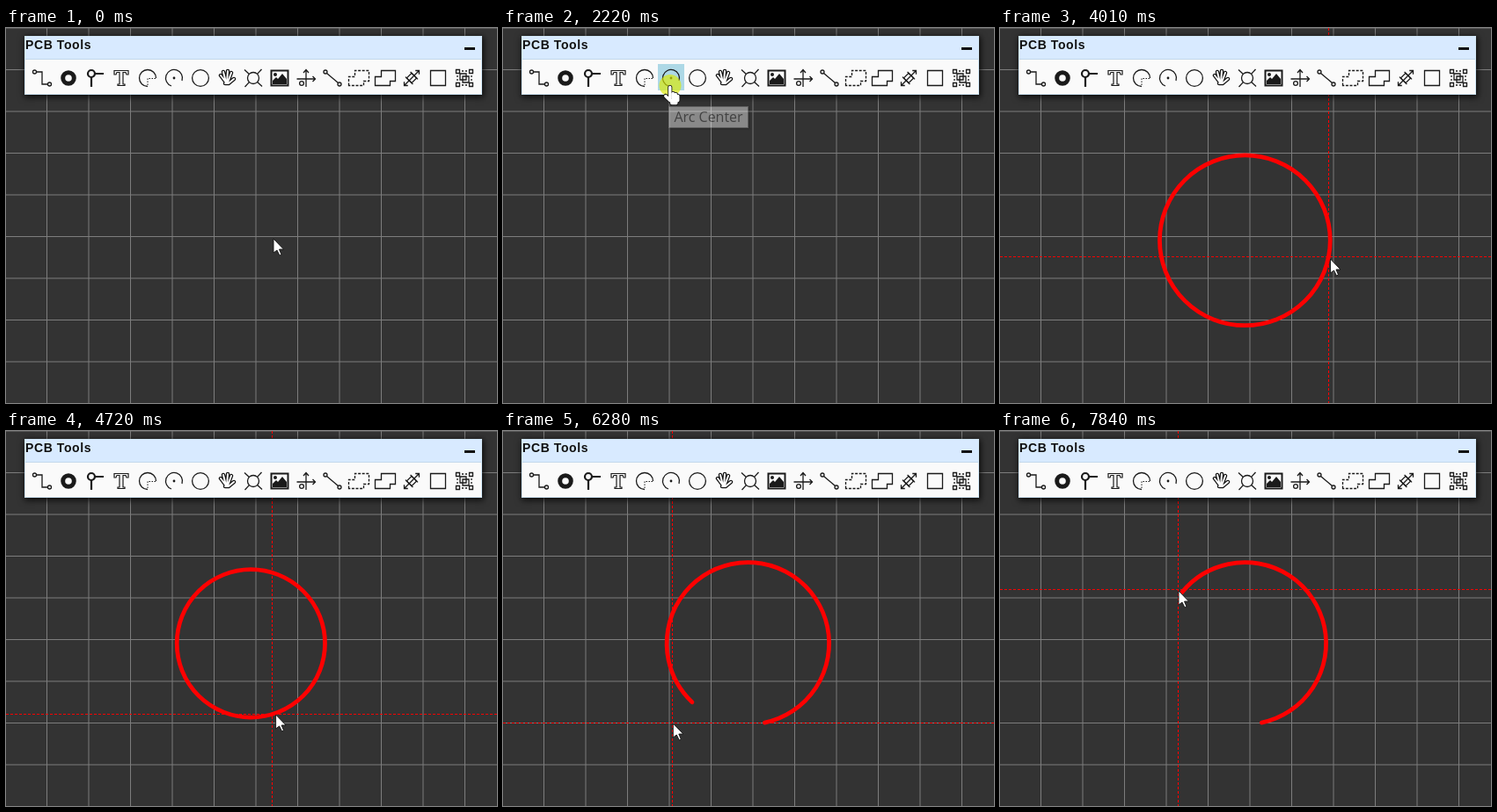
An HTML page with a canvas for the animation above (8000 ms loop, 558 by 427 pixels).

```html
<!DOCTYPE html>
<html lang="en">
<head>
<meta charset="utf-8">
<title>PCB Tools</title>
<style>
  html, body { margin: 0; width: 100%; height: 100%; overflow: hidden; background: #333; }
  #stage { position: absolute; left: 0; top: 0; width: 558px; height: 427px; overflow: hidden; }
  canvas, svg { position: absolute; left: 0; top: 0; display: block; }
  #bar {
    position: absolute; left: 21px; top: 9px; width: 520px; height: 67px; box-sizing: border-box;
    background: #fafafa; border: 1px solid #d0e6f5; box-shadow: 1px 2px 7px 1px rgba(0, 0, 0, .75);
  }
  #title {
    position: absolute; left: 0; top: 0; width: 518px; height: 26px; background: #d8eaff;
    border-bottom: 1px solid #c2d8ec; box-sizing: border-box; color: #111; letter-spacing: .6px;
    font: bold 14px/19px "Liberation Sans", Arial, sans-serif;
  }
  #title i { position: absolute; left: 499px; top: 12px; width: 12px; height: 3px; background: #111; }
  #hover { position: absolute; top: 41px; width: 30px; height: 30px; background: #add8e6; }
  #tip {
    position: absolute; left: 188px; top: 89px; width: 91px; height: 25px; box-sizing: border-box;
    border: 1px solid #999; background: #fff; color: #575757; text-align: center; white-space: nowrap;
    box-shadow: 1px 1px 2px rgba(0, 0, 0, .5); font: 16px/23px "Open Sans", "Noto Sans", sans-serif;
  }
  #icons { fill: none; stroke: #1a1a1a; stroke-width: 1.3; }
  .solid { fill: #1a1a1a; stroke: none; }
  .outline { fill: none; stroke: #111; stroke-linecap: round; stroke-linejoin: round; }
  .inside { fill: none; stroke: #fff; stroke-linecap: round; stroke-linejoin: round; }
</style>
</head>
<body>
<div id="stage">
  <canvas id="board" width="558" height="427"></canvas>
  <div id="bar"><div id="title">PCB Tools<i></i></div></div>
  <div id="hover"></div>
  <svg id="icons" width="558" height="427"></svg>
  <div id="tip">Arc Center</div>
  <svg width="558" height="427">
    <circle id="press" r="12.5" fill="rgb(218,234,0)" fill-opacity=".66"/>
    <path id="arrow" fill="#fff" stroke="#111" stroke-width=".9" d="M0 0V16L4 13 7 19 9 18 6.5 12H11.5Z"/>
    <g id="hand"></g>
  </svg>
</div>
<script>
const LOOP = 8000, TICK = 77.9, GRID = 47.5, STEP = GRID / 10;
const START = 37, FIX = 71, SWEEP = 77;   // ticks: centre set, radius set, sweep begins
const clicks = [2, 26, START, FIX];
const $ = id => document.getElementById(id);
const ctx = $('board').getContext('2d');

// pointer moves: first tick, last tick, destination
const home = [304, 240];
const moves = [
  [5, 13, 190.5, 65.5], [28, 35, 281, 243], [39, 45, 369, 263], [46, 52, 376, 263],
  [53, 60, 306.6, 323], [60, 67, 298, 333], [76, 80, 193.3, 333], [80, 87, 171, 303],
  [88, 93, 171, 148], [94, 100, 203, 182]
];

// icon helpers
const line = (d, attr = '') => `<path d="${d}" ${attr}/>`;
const ring = (x, y, r, attr = '') => `<circle cx="${x}" cy="${y}" r="${r}" ${attr}/>`;
const turn = (deg, s) => `<g transform="rotate(${deg})">${s}</g>`;
const spin = s => [0, 90, 180, 270].map(a => turn(a, s)).join('');
const ends = (x, y) => ring(-x, -y, 2) + ring(x, y, 2);
const box = r => line(`M${-r} ${-r}H${r}V${r}H${-r}Z`);
const glove = (d, w, rim) =>
  line(d, `class="outline" stroke-width="${w + rim}"`) + line(d, `class="inside" stroke-width="${w}"`);
const step = 'M-11.5 8.5V-1.5H-4.5V-8.5H11.5V3.5H5.5V8.5Z';
const fingers = 'M-1 5L-7-3M-1 5L-4-7M0 5L1-8M1 5L5-6M2 6L8 1M-2 6H2';
const finger = 'M0 2V15M3.5 9V17M6.5 10V17M9 12V17M-5 12L0 17M2 17V20H7V17Z';

const icons = [
  ends(8.5, 7) + line('M-6.5-7H0V7H6.5'),
  ring(0, 0, 6.3, 'stroke-width="5"'),
  `<g stroke-width="2.2">${ring(-4, -5, 4)}${line('M-4-1V10M0-5H10')}</g>`,
  line('M-8-8.5H8V-4H6L5-6.5H2V7H4V8.5H-4V7H-2V-6.5H-5L-6-4H-8Z', 'stroke-width="1.2"'),
  line('M0 9.5A9.5 9.5 0 1 1 9.5 0') + line('M9 .5H0V9', 'stroke-width="1" stroke-dasharray="1.5"'),
  line('M-3 9A9.5 9.5 0 1 1 9 3') + ring(0, 0, 1.4, 'class="solid"'),
  ring(0, 0, 9.4),
  glove(fingers, 2, 2.4),
  ring(0, 0, 6.5) + spin(line('M4.6 4.6L10 9.5')),
  line('M-9.5-8.5H9.5V8.5H-9.5Z', 'stroke-width="2"') + ring(-5, -4, 2, 'class="solid"') +
    line('M-8 7V3L-4-1-2 1 3-5 8 1V7Z', 'class="solid"'),
  line('M0 10V-9M-3-6L0-9.5 3-6M-10.5 1H10.5M7.5-2L10.5 1 7.5 4') + ring(-5, 6, 2.4),
  ends(8, 7) + line('M-6.5-5.5L6.5 5.5'),
  line(step, 'stroke-dasharray="3 1.6"'),
  line(step),
  turn(-45, box(4) + line('M-12 0H12M-9-3L-12 0-9 3M9-3L12 0 9 3M-4-6V6M4-6V6')),
  box(8.5),
  line('M-5-5H2V2H-5ZM-2-2H5V5H-2Z') + spin(line('M-9.5-9.5h4v4h-4z') + line('M-3-8H-1M1-8H3'))
];
$('icons').innerHTML = icons.map((s, i) => `<g transform="translate(${41 + 30 * i} 57)">${s}</g>`).join('');
$('hand').innerHTML = glove(finger, 3.4, 1.6);

const clamp = v => Math.min(1, Math.max(0, v));
const smooth = f => f * f * (3 - 2 * f);

function pointer(n) {
  let [x, y] = home;
  for (const [a, b, tx, ty] of moves) {
    const f = smooth(clamp((n - a) / (b - a)));
    x += (tx - x) * f;
    y += (ty - y) * f;
  }
  return [x, y];
}
const snap = (v, base) => base + Math.floor((v - base) / STEP) * STEP;
const cross = n => {
  const [x, y] = pointer(n);
  return [snap(x, 45.6), snap(y, 47.1)];
};
const centre = cross(START);
function polar(n) {
  const [x, y] = cross(n), dx = x - centre[0], dy = y - centre[1];
  return { r: Math.hypot(dx, dy), a: Math.atan2(dy, dx) };
}
const fixed = polar(FIX);

function lines(xs, ys) {
  ctx.beginPath();
  for (const x of xs) { ctx.moveTo(x, 0); ctx.lineTo(x, 427); }
  for (const y of ys) { ctx.moveTo(0, y); ctx.lineTo(558, y); }
  ctx.stroke();
}

function grid() {
  const steps = [...Array(12).keys()].map(i => i * GRID);
  ctx.fillStyle = '#333';
  ctx.fillRect(0, 0, 558, 427);
  ctx.strokeStyle = '#7d7d7d';
  ctx.lineWidth = 1;
  lines(steps.map(v => v - 1), steps);
}

function crosshair(n) {
  const [x, y] = cross(n).map(v => Math.floor(v) + .5);
  ctx.lineCap = 'butt';
  ctx.setLineDash([3, 2]);
  lines([x], [y]);
  ctx.setLineDash([]);
}

function arc(n) {
  const p = polar(n), r = n < FIX ? p.r : fixed.r;
  if (r < 1) return;
  ctx.lineWidth = STEP;
  ctx.lineCap = 'round';
  ctx.beginPath();
  if (n < SWEEP) ctx.arc(...centre, r, 0, Math.PI * 2);
  else ctx.arc(...centre, r, fixed.a, p.a, true);
  ctx.stroke();
}

function place(el, x, y, on) {
  el.setAttribute('transform', `translate(${x} ${y})`);
  el.style.display = on ? '' : 'none';
}

function draw(t) {
  const n = Math.max(0, Math.floor(t / TICK - .3));
  const [x, y] = pointer(n);
  const over = y > 41 && y < 72;
  // a press lasts until the pointer moves on
  const pressed = clicks.some(c => n >= c && String(pointer(c)) === String([x, y]));

  grid();
  ctx.strokeStyle = '#f00';
  if (n > 28) crosshair(n);
  if (n >= START) arc(n);

  $('hover').style.display = over ? '' : 'none';
  $('hover').style.left = 26 + Math.floor((x - 26) / 30) * 30 + 'px';
  $('tip').style.opacity = clamp(Math.min((n - 18) / 3, (29.5 - n) * .28));
  place($('press'), x - .5, y, pressed);
  place($('arrow'), x, y, !over);
  place($('hand'), x - .7, y, over);
}

const t0 = performance.now();
function loop() {
  draw((performance.now() - t0) % LOOP);
  requestAnimationFrame(loop);
}
loop();
</script>
</body>
</html>
```
